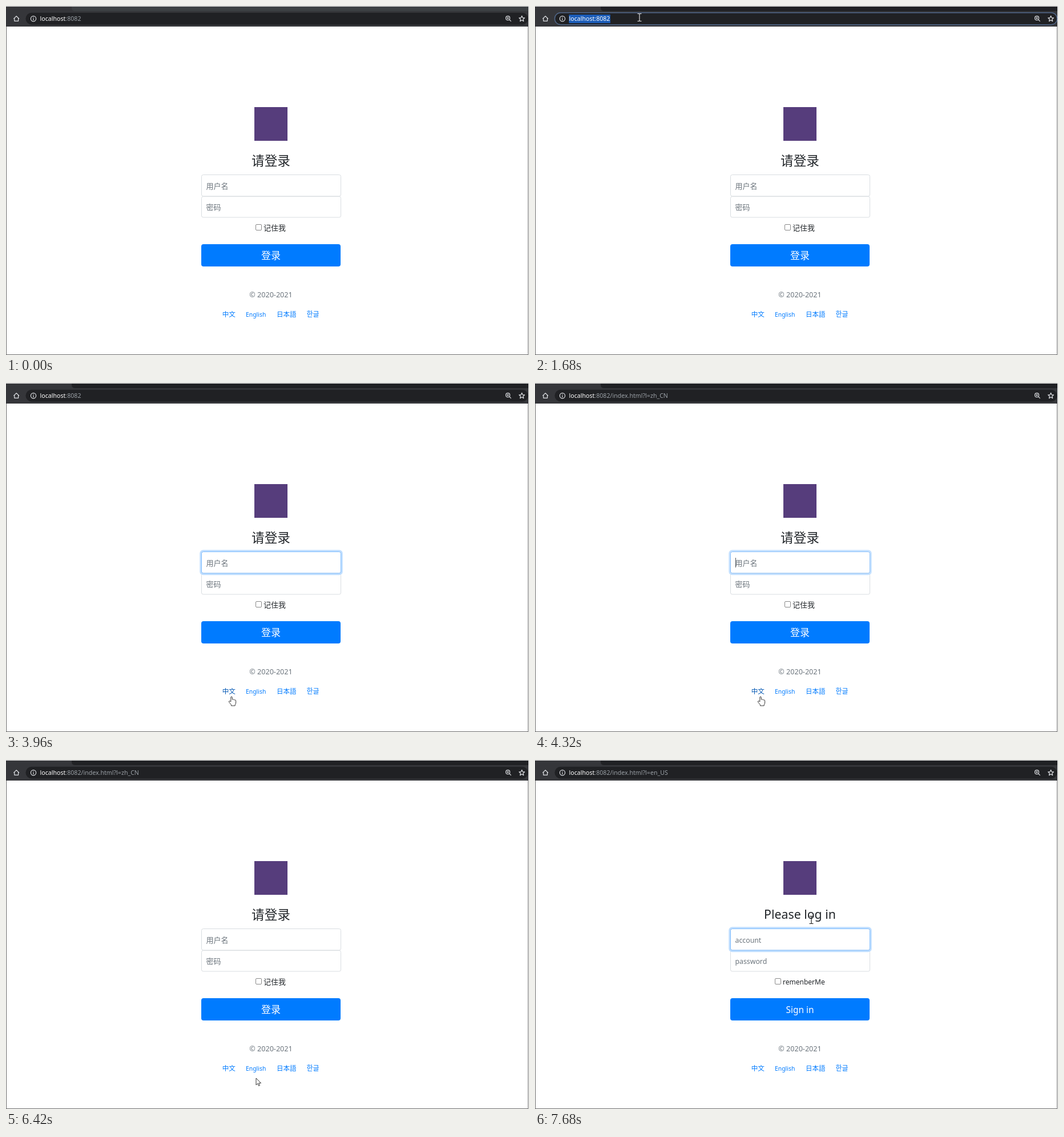
These frames come from a looping animation (916 px wide and 611 px high, 7.74 s). An HTML page:

```html
<!DOCTYPE html>
<html lang="zh">
<head>
<meta charset="utf-8">
<title>Login</title>
<style>
  html, body { margin: 0; width: 100%; height: 100%; overflow: hidden; background: #fff; }
  svg { display: block; width: 916px; height: 611px; }
  text { font-family: "Noto Sans", "Noto Sans CJK SC", "Noto Sans CJK KR", sans-serif; white-space: pre; }
  .mid { text-anchor: middle; }
  .hint { fill: #6c757d; }
  .link { fill: #007bff; }
  .link.hover { fill: #0056b3; }
  .icon { fill: none; stroke: #dfe1e5; stroke-width: 1.2; stroke-linejoin: round; }
  .glyph { fill: #fff; stroke: #222; stroke-width: .9; stroke-linejoin: round; }
  #url { font-size: 10.62px; fill: #9aa0a6; }
  #url .lit { fill: #fff; }
</style>
</head>
<body>
<svg viewBox="0 0 916 611">
  <rect width="916" height="611" fill="#fff"/>
  <path d="M.5 36V611M914.5 36V611M0 610.5H915" stroke="#6b6b6b"/>

  <rect y="1" width="915" height="35" fill="#35363a"/>
  <path id="strip" d="M115 1H915V9H121Q115 9 115 3Z"/>
  <path d="M0 .5H916" stroke="#e6e6e6"/>
  <rect id="bar" x="34.5" y="11.7" width="880" height="21" rx="10.5" fill="#202124" stroke-width="1.4"/>
  <g class="icon">
    <path d="M13.4 22.4L18.2 17.8L23 22.4M14.8 21.5V26.3H21.6V21.5"/>
    <circle cx="48" cy="22.2" r="4.6"/>
    <path d="M48 21.6V25M48 19.4V20.5"/>
    <circle cx="879" cy="21.2" r="3.5"/>
    <path d="M881.6 23.8L884.6 26.8M877.3 21.2H880.7M879 19.5V22.9"/>
    <path d="M903.5 17.3L904.9 20.6L908.4 20.9L905.7 23.2L906.6 26.7L903.5 24.8L900.4 26.7L901.3 23.2L898.6 20.9L902.1 20.6Z"/>
  </g>
  <rect id="mark" y="15" height="15" fill="#1b5cb8"/>
  <text id="url" x="59.5" y="26"><tspan id="host" class="lit"></tspan><tspan id="tail"></tspan><tspan id="picked" class="lit"></tspan><tspan id="rest"></tspan></text>

  <rect x="435" y="177" width="58" height="59" fill="#563d7c"/>
  <text id="title" class="mid" x="464" fill="#212529"></text>

  <g fill="#fff" stroke="#d9dde1">
    <rect x="342.5" y="333.5" width="244" height="36.5" rx="3"/>
    <rect x="342.5" y="295.5" width="244" height="37.5" rx="3"/>
  </g>
  <g id="ring" fill="none">
    <rect x="340.8" y="293.8" width="247.4" height="40.9" rx="4.5" stroke="#bfdeff" stroke-width="3"/>
    <rect x="342.5" y="295.5" width="244" height="37.5" rx="3" stroke="#80bdff"/>
  </g>
  <text id="user" class="hint" x="350.5" y="319.5"></text>
  <text id="pass" class="hint" x="350.5" y="357"></text>
  <path id="caret" d="M351.5 306V323" stroke="#495057"/>

  <rect id="box" y="382.5" width="10" height="10" rx="1.5" fill="#fff" stroke="#8a8a8a"/>
  <text id="keep" y="393" fill="#212529"></text>
  <rect x="342" y="417" width="244" height="39" rx="4" fill="#007bff"/>
  <text id="enter" class="mid" x="464" y="443.3" fill="#fff"></text>

  <text class="mid hint" x="464" y="510" font-size="12.6">© 2020-2021</text>
  <text class="link" x="378.7" y="544" font-size="11.6">中文</text>
  <text class="link" x="420" y="544" font-size="10.4">English</text>
  <text class="link" x="474" y="544" font-size="11.5" lang="ja">日本語</text>
  <text class="link" x="526.5" y="543.5" font-size="12" lang="ko">한글</text>

  <g id="cursor">
    <path id="arrow" class="glyph" d="M0 0V12L2.8 9.4L4.6 13.5L6.4 12.7L4.7 8.7H8.6Z"/>
    <path id="beam" d="M-3.5-6.5H-1L0-6L1-6.5H3.5M0-6V6M-3.5 6.5H-1L0 6L1 6.5H3.5" fill="none" stroke-width="1.1"/>
    <path id="hand" class="glyph" d="M-1.2 9V.8Q0-.8 1.2 .8V5Q2.4 4 3.4 5.4Q4.8 4.5 5.6 6Q7.4 5.4 7.6 7.4V11Q7.4 13 6.2 14.2V16H-.6V14.2L-4.6 9.3Q-4.6 7.2-2.8 7.8Z"/>
  </g>
</svg>
<script>
const LOOP = 7740, STEP = 60, FADE = 150, BLINK = 530;
const $ = id => document.getElementById(id);
const set = (id, attrs) => { for (const k in attrs) $(id).setAttribute(k, attrs[k]); };
const show = (id, on) => set(id, { visibility: on ? 'visible' : 'hidden' });
const clamp = v => Math.max(0, Math.min(1, v));
const smooth = v => v * v * (3 - 2 * v);
const within = (t, a, b) => t >= a && t < b;

// Pointer moves: start, end, target x, y and sideways bend; it rests in between
const moves = [
  [0, 60, 905, 70],
  [60, 420, 618, 420, -.04],
  [420, 780, 246, 98, .02],
  [780, 1140, 180, 138],
  [1140, 1560, 183, 20, -.08],
  [2820, 3300, 342, 606, -.02],
  [3540, 3840, 395, 549],
  [4320, 5040, 174, 18],
  [5040, 5160, 164, 20],
  [5160, 5520, 254, 18],
  [5640, 5880, 207, 122],
  [5940, 6420, 438, 557, .16],
  [6420, 6600, 440, 541],
  [6840, 7200, 315, 310],
  [7200, 7680, 484, 280, -.4]
];

// Login field focus, and the moments the two languages load
const focusSpans = [[2550, 3960], [4200, 5100], [6900, LOOP + FADE]];
const LOAD_ZH = 4140, LOAD_EN = 6840;

const words = {
  zh: { title: ['请登录', 22.6], user: ['用户名', 13], pass: ['密码', 13], keep: ['记住我', 13], enter: ['登录', 17], x: 451, y: 279 },
  en: { title: ['Please log in', 21.3], user: ['account', 12.3], pass: ['password', 12.3], keep: ['remenberMe', 12], enter: ['Sign in', 15.4], x: 434, y: 278 }
};

function pointer(t) {
  let x = 0, y = 0;
  for (const [a, b, toX, toY, bend = 0] of moves) {
    if (t < a) break;
    const u = clamp((t - a) / (b - a)), p = smooth(u);
    const dx = toX - x, dy = toY - y, side = bend * Math.sin(Math.PI * u);
    x += dx * p - dy * side;
    y += dy * p + dx * side;
  }
  return [x, y];
}

function shape(x, y) {
  const over = (l, t, r, b) => within(x, l, r) && within(y, t, b);
  if (over(342, 417, 586, 456) || over(371, 526, 557, 554)) return 'hand';
  if (over(58, 11, 870, 33) || over(342, 295, 586, 370) || over(401, 258, 527, 286)) return 'beam';
  return 'arrow';
}

function drawAddress(t, x) {
  const query = t < LOAD_ZH ? '' : '/index.html?l=' + (t < LOAD_EN ? 'zh_CN' : 'en_US');
  const url = 'localhost:8082' + query, end = url.length;
  const all = within(t, 1620, 2460), drag = within(t, 5160, 5940);

  let from = all ? 0 : end, to = end;
  if (drag) {
    from = url.indexOf('.html');
    to = t < 5520 ? from + Math.round((end - from) * clamp((x - 162) / 73)) : end;
  }
  const split = Math.min(url.indexOf(':'), from);
  $('host').textContent = url.slice(0, split);
  $('tail').textContent = url.slice(split, from);
  $('picked').textContent = url.slice(from, to);
  $('rest').textContent = url.slice(to);

  const picked = to > from;
  set('mark', {
    x: picked ? $('url').getStartPositionOfChar(from).x : 0,
    width: picked ? $('picked').getComputedTextLength() + .5 : 0
  });
  set('bar', { stroke: all || within(t, 5100, 5940) ? '#50678a' : 'none' });
}

function drawForm(t) {
  const w = words[t < focusSpans[2][0] ? 'zh' : 'en'];
  for (const id of ['title', 'user', 'pass', 'keep', 'enter']) {
    $(id).textContent = w[id][0];
    set(id, { 'font-size': w[id][1] });
  }
  set('title', { y: w.y });
  set('keep', { x: w.x });
  set('box', { x: w.x - 13.5 });

  let glow = 0, caret = false;
  for (const [a, b] of focusSpans) {
    glow += smooth(clamp((t - a) / FADE)) - smooth(clamp((t - b) / FADE));
    caret ||= within(t, a, b) && (t - a) % (2 * BLINK) < BLINK;
  }
  set('ring', { opacity: glow });
  show('caret', caret);
}

function drawCursor(t, x, y) {
  const kind = shape(x, y), visible = t >= 60 && !within(t, 3300, 3540);
  for (const id of ['arrow', 'beam', 'hand']) show(id, visible && id === kind);
  set('cursor', { transform: `translate(${x.toFixed(1)} ${y.toFixed(1)})` });
  set('beam', { stroke: y < 36 ? '#eee' : '#111' });

  for (const link of document.querySelectorAll('.link')) {
    const { x: left, width } = link.getBBox();
    link.classList.toggle('hover', visible && kind === 'hand' && y > 500 && within(x, left - 8, left + width + 8));
  }
}

function draw(t) {
  const [x, y] = pointer(t);
  set('strip', { fill: t < 1140 ? '#3c4043' : '#202124' });
  drawAddress(t, x);
  drawForm(t);
  drawCursor(t, x, y);
}

const start = performance.now();
let last = -1;
function tick() {
  const t = Math.floor((performance.now() - start) % LOOP / STEP) * STEP;
  if (t !== last) draw(last = t);
  requestAnimationFrame(tick);
}
tick();
</script>
</body>
</html>
```
